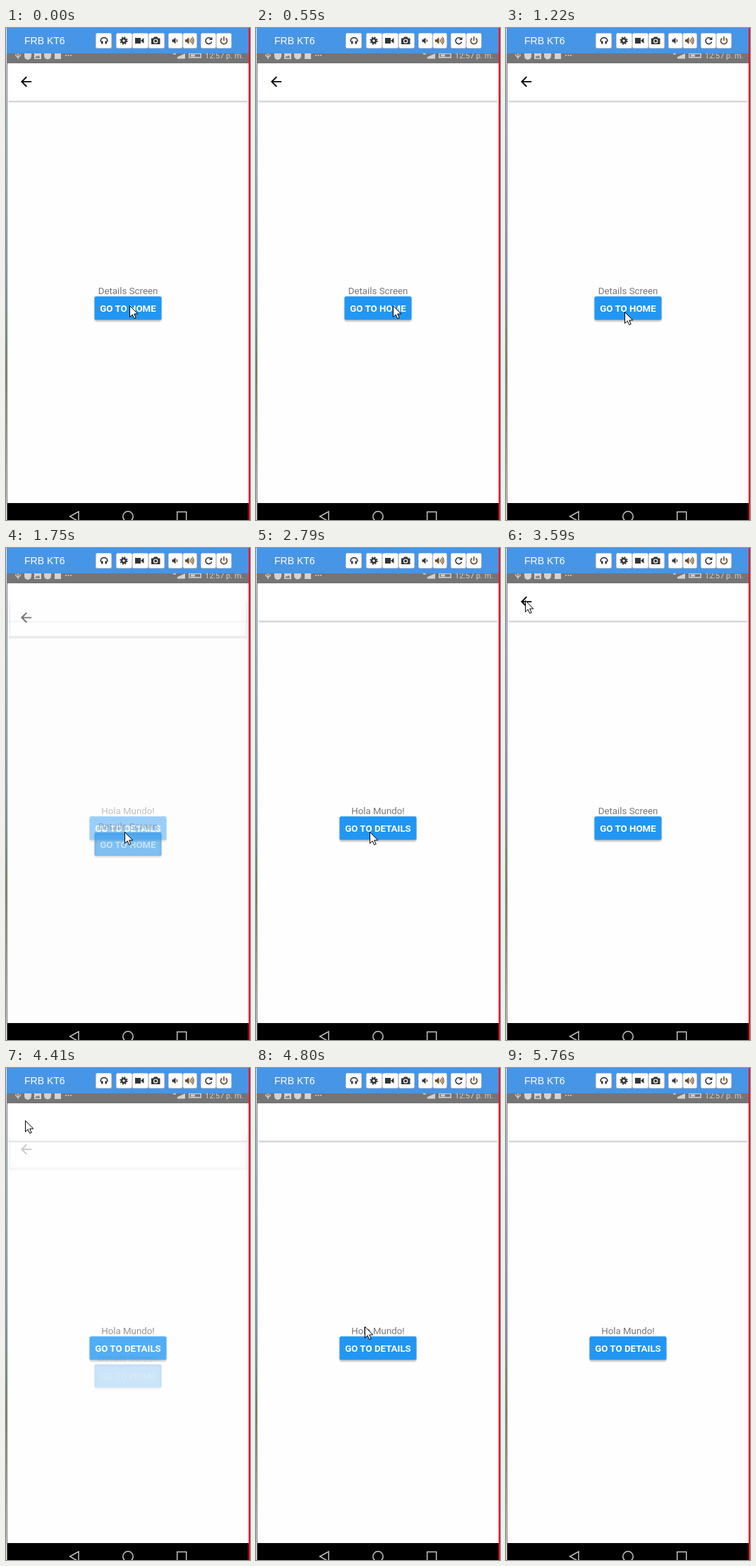
Animation, 346 px wide and 697 px high, one loop 6.29 s. Source, as an HTML page:

```html
<!DOCTYPE html>
<html lang="en">
<head>
<meta charset="utf-8">
<title>Screen navigation</title>
<style>
  html, body { margin: 0; width: 100%; height: 100%; overflow: hidden; background: #fff; }
  svg { display: block; width: 100vw; height: 100vh; }
  text { font-family: Roboto, sans-serif; }
  .label { font-size: 13.3px; fill: #757575; text-anchor: middle; }
  .caption { font-size: 13.3px; font-weight: 700; fill: #fff; text-anchor: middle; }
  .shadow { fill: none; stroke: rgba(0, 0, 0, .3); stroke-width: 2; filter: url(#soft); }
  .lift { fill: rgba(0, 0, 0, .08); }
  .face { fill: #2196f3; }
  .line { fill: none; stroke: #333; stroke-width: 1.6; }
  .warm { fill: #6b4a20; }
  .warm .line, .warm.line { stroke: #6b4a20; }
  .warm.line { fill: none; }
  #details > * { opacity: var(--alpha, 1); }
</style>
</head>
<body>
<svg viewBox="0 0 346 697" preserveAspectRatio="none">
  <defs>
    <filter id="soft" x="-10%" y="-20%" width="120%" height="140%"><feGaussianBlur stdDeviation=".9"/></filter>
    <linearGradient id="desktop" x2="0" y2="1">
      <stop offset="0" stop-color="#e8eef4"/>
      <stop offset=".5" stop-color="#78b4e6"/>
      <stop offset=".7" stop-color="#6f8f3a"/>
      <stop offset="1" stop-color="#e8eef4"/>
    </linearGradient>
  </defs>

  <!-- desktop slivers beside the phone -->
  <rect width="1" height="697" fill="url(#desktop)"/>
  <rect x="1" y="36" width="1" height="661" fill="#777"/>
  <rect x="344" width="2" height="697" fill="#e9152b"/>

  <g id="home"></g>
  <g id="details"></g>

  <!-- status bar -->
  <rect x="2" y="36" width="342" height="14" fill="#757575"/>
  <g fill="#d2d2d2">
    <path d="M17 36V44M14 37V39.5L17 41.5L20 39.5V37" fill="none" stroke="#d2d2d2" stroke-width="1.3"/>
    <path d="M26 36H36V40A5 5 0 0 1 26 40Z"/>
    <path d="M40 36H50V44H40ZM41.5 42.5H48.5L46 38.5L44.3 41L43 39.5Z" fill-rule="evenodd"/>
    <path d="M54 36H64V39.5A5 5 0 0 1 54 39.5Z"/>
    <rect x="69" y="36" width="9" height="8"/>
    <path d="M84 38.7H93" stroke="#d2d2d2" stroke-width="1.5" stroke-dasharray="2 1.5"/>
    <path d="M237 36H241V37.5H237ZM243 43.5V41L254 36V43.5Z"/>
    <path d="M259 36H277V42.5H259ZM260.5 37V41H275.5V37ZM262 37.5H268V40.5H262Z" fill-rule="evenodd"/>
    <text x="282" y="43" font-size="11">12:57 p. m.</text>
  </g>

  <!-- emulator toolbar -->
  <rect x="1" width="343" height="36" fill="#4795e6"/>
  <text x="26" y="23" font-size="14" fill="#fff" style="font-family:'Liberation Sans',Arial,sans-serif">FRB KT6</text>
  <g id="tools"></g>
  <g fill="#333">
    <path class="line" d="M134.2 19.5V18A4.8 4.4 0 0 1 143.8 18V19.5"/>
    <path d="M135 18.5H137.5V22.5H135ZM140.5 18.5H143V22.5H140.5Z"/>
    <circle class="line" cx="167" cy="18" r="3" style="stroke-width:2.6"/>
    <circle class="line" cx="167" cy="18" r="4.9" stroke-dasharray="1.95 1.9"/>
    <path d="M183 14H191V22H183ZM191 18L195.5 14V22Z"/>
    <path d="M206 14.5H209L210 12.5H214.5L215.5 14.5H218.5V23H206Z"/>
    <circle cx="212.2" cy="18.6" r="2.6" stroke="#fff" stroke-width="1.2"/>
    <path d="M235.5 16.2H237.5L240.5 13.5V22.5L237.5 19.8H235.5Z"/>
    <path class="line" d="M242 16Q243.5 18 242 20" style="stroke-width:1.2"/>
    <g class="warm">
      <path d="M254 16.2H256L259.5 13V23L256 19.8H254Z"/>
      <path class="line" d="M261 16Q262.5 18 261 20M262.5 14.3Q265.5 18 262.5 21.7M264 12.7Q268.5 18 264 23.3" style="stroke-width:1.2"/>
    </g>
    <path class="line" d="M291 15.5A4.4 4.4 0 1 0 291.7 19.5"/>
    <path d="M292.5 12.5V17H288Z"/>
    <path class="line warm" d="M306.3 14.5A4.5 4.5 0 1 0 311.7 14.5M309 12V18"/>
  </g>

  <!-- navigation bar -->
  <rect x="2" y="673" width="342" height="24" fill="#000"/>
  <g fill="none" stroke="#c4c4c4" stroke-width="1.5">
    <path d="M103 685V699L90.5 692Z"/>
    <circle cx="173" cy="692" r="7.2"/>
    <rect x="242.7" y="685.5" width="13" height="13"/>
  </g>

  <path id="cursor" d="M.5 .5V16.5L4.2 13L6.7 18.6L9.2 17.5L6.7 12H11.8Z" fill="#fff" stroke="#000"/>
</svg>

<script>
const LOOP = 6290;
const FPS = 7.5;
const LEAD = 14;      // ms by which those steps run ahead of the clock
const TRAVEL = 50;    // px the details card slides while it fades
const SLIDE = 1.2;    // slide length in steps
const TAP = 32;       // step at which the back arrow is pressed

const $ = id => document.getElementById(id);
const clamp = v => Math.min(1, Math.max(0, v));
const easeOut = v => 1 - (1 - v) ** 2;
const progress = (step, from, length) => clamp((step - from) / length);

const box = (x, y, w, h, attrs) =>
  `<rect x="${x}" y="${y}" width="${w}" height="${h}" ${attrs}/>`;

function screen(label, caption, width, extra = '') {
  const x = 173 - width / 2;
  return box(2, 50, 342, 680, 'fill="#fefefe"')
    + '<path class="shadow" d="M4.5 54V103.4H341.5V54"/>'
    + box(2, 50, 342, 53, 'fill="#fff"')
    + extra
    + `<text class="label" x="173" y="376.5">${label}</text>`
    + box(x + 1, 382.5, width - 2, 32, 'rx="2" class="shadow lift"')
    + box(x, 380.3, width, 33.2, 'rx="2" class="face"')
    + `<text class="caption" x="173" y="402.3">${caption}</text>`;
}

const arrow = '<g><circle id="ripple" cx="29" cy="76" r="20" fill="rgba(0,0,0,.12)"/></g>'
  + '<path transform="translate(17.2 64.7) scale(.95)" d="M20 11H7.83l5.59-5.59L12 4l-8 8 8 8 1.41-1.41L7.83 13H20v-2z"/>';

$('home').innerHTML = screen('Hola Mundo!', 'GO TO DETAILS', 109);
$('details').innerHTML = screen('Details Screen', 'GO TO HOME', 95, arrow);

// Each toolbar group is split into equal buttons.
function buttonGroup(x, width, count) {
  const size = width / count;
  return Array.from({ length: count }, (_, i) =>
    box(x + i * size + .5, 7.5, size - 1, 21, 'rx="2" fill="#fff" stroke="#ccc"')).join('');
}
$('tools').innerHTML = buttonGroup(127, 23, 1) + buttonGroup(156, 69, 3)
  + buttonGroup(230, 41, 2) + buttonGroup(276, 44, 2);

// Pointer gestures: first step, length in steps, destination.
const origin = { x: 175, y: 393 };
const gestures = [
  { from: 1, length: 1, x: 194, y: 393 },
  { from: 7, length: 2, x: 168, y: 402 },
  { from: 20, length: 1, x: 161, y: 402 },
  { from: 21, length: 5, x: 27, y: 74 },
  { from: 34, length: 3, x: 170, y: 402 },
  { from: 40, length: 3, x: 333, y: 722 }
];

function pointerAt(step) {
  return gestures.reduce((p, g) => {
    const k = easeOut(progress(step, g.from, g.length));
    return { x: p.x + (g.x - p.x) * k, y: p.y + (g.y - p.y) * k };
  }, origin);
}

// 0 = details fully shown, 1 = slid away
function dismissal(step) {
  if (step < 22) return progress(step, 12.46, SLIDE);
  if (step < TAP) return 1 - easeOut(progress(step, 22, SLIDE));
  return progress(step, TAP + .06, SLIDE);
}

function render(t) {
  const step = Math.floor((t + LEAD) * FPS / 1000);
  const { x, y } = pointerAt(step);
  const gone = dismissal(step);
  $('cursor').setAttribute('transform', `translate(${Math.round(x)} ${Math.round(y)})`);
  $('details').setAttribute('transform', `translate(0 ${gone * TRAVEL})`);
  $('details').style.setProperty('--alpha', 1 - gone);
  $('ripple').style.visibility = step === TAP ? 'visible' : 'hidden';
}

const start = performance.now();
function tick() {
  render((performance.now() - start) % LOOP);
  requestAnimationFrame(tick);
}
tick();
</script>
</body>
</html>
```
